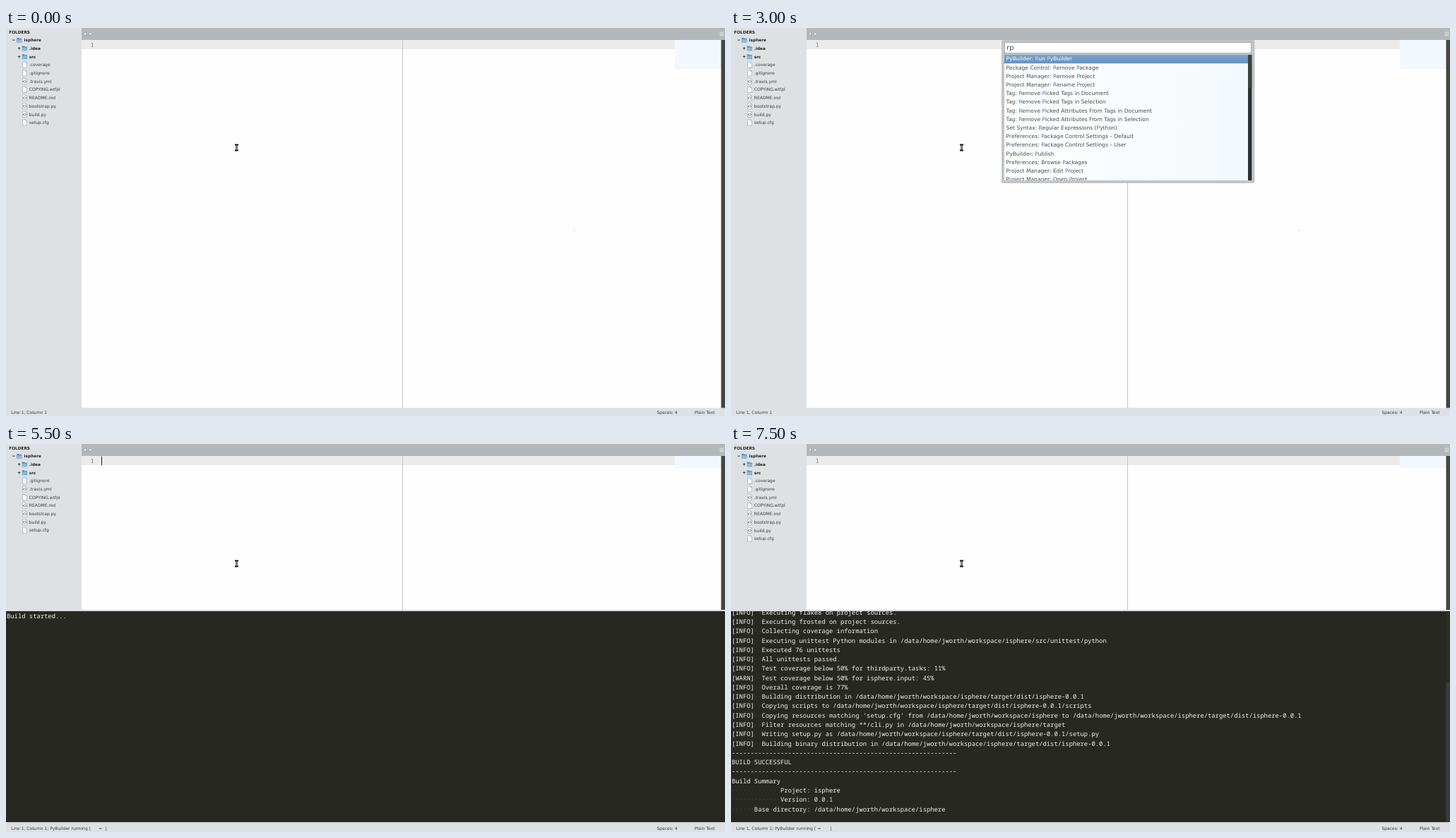
Animation of 1018 by 550 pixels, one loop 8 s. Source, as an HTML page:

```html
<!DOCTYPE html>
<html lang="en">
<head>
<meta charset="utf-8">
<title>Editor build run</title>
<style>
html, body { margin: 0; width: 100%; height: 100%; overflow: hidden; background: #fefefe; }
svg { display: block; width: 1018px; height: 550px; text-rendering: geometricPrecision; }
text { white-space: pre; }
.ui { font: 6.03px "DejaVu Sans", sans-serif; fill: #3a3b3c; }
.bold { font: bold 5.78px "DejaVu Sans", sans-serif; fill: #222; }
.row { font: 7.58px "DejaVu Sans", sans-serif; fill: #4a4c4f; }
.row .hit { fill: #3f78b8; }
.row.on { fill: #fff; }
.row.on .hit { fill: #c3dcf6; }
.query { font: 9.7px "DejaVu Sans", sans-serif; fill: #3f4a5c; }
.mono { font: 8.86px "Noto Sans Mono", "DejaVu Sans Mono", monospace; fill: #f4f4ee; }
.dim { fill: #55564e; }

/* Eight second loop, one slot every 6.25% */
.anim { animation: 8s step-end infinite; }
#caret { animation-name: caret; }
#palette { animation-name: palette; }
#allRows { animation-name: allRows; }
#hitRows { animation-name: hitRows; }
#typed { animation-name: typed; }
#panel, #running { animation-name: panel; }
#bigMap { animation-name: bigMap; }
#mark { animation-name: mark; }
#coverage { animation-name: coverage; }
#files { animation-name: files; }
#part1 { animation-name: part1; }
#part2 { animation-name: part2; }
#part3, #bar { animation-name: part3; }
#part4 { animation-name: part4; }
#log { animation-name: log; }
@keyframes caret {
  0%, 12.5%, 25%, 50%, 62.5%, 93.75%, 100% { opacity: 0; }
  6.25%, 18.75%, 43.75%, 56.25%, 68.75%, 87.5% { opacity: 1; }
  81.25% { opacity: .35; }
}
@keyframes palette { 0%, 43.75%, 100% { visibility: hidden; } 25% { visibility: visible; } }
@keyframes allRows { 0%, 31.25%, 100% { visibility: hidden; } 25% { visibility: visible; } }
@keyframes hitRows { 0%, 43.75%, 100% { visibility: hidden; } 31.25% { visibility: visible; } }
@keyframes typed { 0%, 37.5%, 100% { visibility: hidden; } 31.25% { visibility: visible; } }
@keyframes panel { 0% { visibility: hidden; } 43.75%, 100% { visibility: visible; } }
@keyframes bigMap { 0% { visibility: visible; } 43.75%, 100% { visibility: hidden; } }
@keyframes mark {
  0%, 43.75% { transform: translateX(6.36px); }
  50% { transform: translateX(12.72px); }
  56.25%, 93.75%, 100% { transform: translateX(2.12px); }
  62.5% { transform: translateX(8.48px); }
  68.75%, 81.25% { transform: translateX(10.6px); }
  75% { transform: translateX(4.24px); }
  87.5% { transform: translateX(6.36px); }
}
@keyframes coverage { 0%, 75%, 100% { visibility: visible; } 62.5% { visibility: hidden; } }
@keyframes files { 0%, 75%, 100% { transform: none; } 62.5% { transform: translateY(-11.69px); } }
@keyframes part1 { 0% { visibility: hidden; } 75%, 100% { visibility: visible; } }
@keyframes part2 { 0% { visibility: hidden; } 81.25%, 100% { visibility: visible; } }
@keyframes part3 { 0% { visibility: hidden; } 87.5%, 100% { visibility: visible; } }
@keyframes part4 { 0% { visibility: hidden; } 93.75%, 100% { visibility: visible; } }
@keyframes log {
  0% { transform: none; }
  87.5% { transform: translateY(-58.4px); }
  93.75%, 100% { transform: translateY(-151.4px); }
}
</style>
</head>
<body>
<svg viewBox="0 0 1018 550" xmlns="http://www.w3.org/2000/svg">
  <defs>
    <linearGradient id="rowFill" x1="0" y1="0" x2="0" y2="1">
      <stop offset="0" stop-color="#7aa3ca"/><stop offset="1" stop-color="#6492c0"/>
    </linearGradient>
    <linearGradient id="listFill" x1="0" y1="0" x2="1" y2="0">
      <stop offset="0" stop-color="#fdfefe"/><stop offset="1" stop-color="#f4f9fd"/>
    </linearGradient>
    <clipPath id="listClip"><rect x="387" y="38" width="345" height="178"/></clipPath>
    <clipPath id="logClip"><rect y="237" width="1018" height="299"/></clipPath>
    <g id="page">
      <path d="M.6-4.2H4.6L6.4-2.4V4.2H.6Z" fill="#fbfbfb" stroke="#9a9da0" stroke-width=".6"/>
      <path d="M4.6-4.2V-2.4H6.4" fill="none" stroke="#9a9da0" stroke-width=".5"/>
    </g>
    <g id="code">
      <use href="#page"/>
      <path d="M2.9-1.4L1.5.3 2.9 2M4.1-1.4L5.5.3 4.1 2" fill="none" stroke="#333" stroke-width=".8"/>
    </g>
    <g id="folder">
      <path d="M0-3.2H3L3.7-2.3H7.2V3.5H0Z" fill="#4f8dc6"/>
      <path d="M.4-1H6.8V3.1H.4Z" fill="#8dbbe4"/>
    </g>
  </defs>

  <rect width="1018" height="550" fill="#fefefe"/>
  <rect x="107" y="17" width="840" height="13" fill="#ecebeb"/>
  <rect x="561" y="17" width="1" height="522" fill="#c3c3c3"/>
  <rect x="947" y="17" width="65.5" height="16.5" fill="#f2f8fd"/>
  <rect id="bigMap" class="anim" x="947" y="17" width="65.5" height="41" fill="#f2f8fd"/>
  <rect x="1012.5" y="17" width="5.5" height="522" fill="#434444"/>
  <rect x="804" y="286" width="1" height="2" fill="#b5b5b5"/>
  <text class="mono" x="119.6" y="27.2" style="fill:#858585">1</text>
  <rect id="caret" class="anim" x="135" y="17.5" width="1" height="12.5" fill="#222"/>

  <rect x="107" width="911" height="17" fill="#b4b8bb"/>
  <g fill="#eef0f1" stroke="#85898c" stroke-width=".5">
    <path d="M113.6 5.4V11L109.8 8.2Z"/><path d="M118 5.4V11L121.8 8.2Z"/>
  </g>
  <path d="M1010.5 6.2H1016M1010.5 8.4H1016M1010.5 10.6H1016" stroke="#e3e5e6" stroke-width="1"/>

  <rect width="107" height="539" fill="#dde1e4"/>
  <g id="side"></g>

  <g id="pointer" fill="none">
    <path d="M324 165.5H329M324 173.5H329M326.5 165.5V173.5" stroke="#111" stroke-width="2.2"/>
    <path d="M326.5 166.3V172.7" stroke="#ddd" stroke-width=".6"/>
  </g>

  <g id="palette" class="anim">
    <rect x="383" y="17" width="358.5" height="203" rx="2" fill="#c2c5c7"/>
    <rect x="387.3" y="20.3" width="349.4" height="15.4" fill="#fff" stroke="#8b9196" stroke-width=".7"/>
    <rect x="387" y="38" width="345" height="178" fill="url(#listFill)"/>
    <rect x="387" y="38" width="345" height="12.2" fill="url(#rowFill)"/>
    <rect x="732" y="38" width="5.3" height="178" fill="#2c2e2f"/>
    <rect x="732" y="38" width="5.3" height="47" fill="#3d3f40"/>
  </g>
  <g clip-path="url(#listClip)">
    <g id="allRows" class="anim"></g>
    <g id="hitRows" class="anim"></g>
  </g>
  <g id="typedText"></g>

  <g id="panel" class="anim">
    <rect y="235" width="1018" height="304" fill="#d9dbdc"/>
    <rect y="237" width="1018" height="299" fill="#272822"/>
  </g>
  <g clip-path="url(#logClip)"><g id="log" class="anim"></g></g>
  <g id="bar" class="anim">
    <rect x="1012.5" y="237" width="5.5" height="299" fill="#2b2c29"/>
    <rect x="1012.5" y="338" width="5.5" height="198" fill="#3b3c39"/>
  </g>

  <rect y="538.5" width="1018" height="11.5" fill="#dde1e4"/>
  <g class="ui">
    <text x="7.2" y="547.2">Line 1, Column 1</text>
    <text x="921.4" y="547.2">Spaces: 4</text>
    <text x="975" y="547.2">Plain Text</text>
    <g id="running" class="anim">
      <text x="58.2" y="547.2">; PyBuilder running [</text>
      <text id="mark" class="anim" x="120.4" y="547.2">=</text>
      <text x="140.3" y="547.2">]</text>
    </g>
  </g>
</svg>
<script>
const $ = id => document.getElementById(id);

function add(parent, tag, attrs, text) {
  const el = document.createElementNS("http://www.w3.org/2000/svg", tag);
  for (const key in attrs) el.setAttribute(key, attrs[key]);
  if (text) el.textContent = text;
  return parent.appendChild(el);
}

// Sidebar
const side = $("side");
const rowY = i => 17.1 + 11.69 * i;
const label = (g, x, y, text, cls) => add(g, "text", { x, y: y + 2.2, class: cls }, text);
const icon = (g, name, x, y) => add(g, "use", { href: "#" + name, x, y });

label(side, 4.2, 5.9, "FOLDERS", "bold");
["isphere", ".idea", "src"].forEach((name, i) => {
  const y = rowY(i), x = i ? 22.8 : 15.2;
  icon(side, "folder", x, y);
  label(side, i ? 32.8 : 25.6, y, name, "bold");
  add(side, "path", {
    d: `M${x - 6} ${y}h3.6` + (i ? `m-1.8 -1.8v3.6` : ""),
    stroke: "#444", "stroke-width": 1.1
  });
});
const coverage = add(side, "g", { id: "coverage", class: "anim" });
const files = add(side, "g", { id: "files", class: "anim" });
[".coverage", ".gitignore", ".travis.yml", "COPYING.wtfpl", "README.md",
 "bootstrap.py", "build.py", "setup.cfg"].forEach((name, i) => {
  const g = i ? files : coverage, y = rowY(i + 3);
  icon(g, /\.(yml|md|py)$/.test(name) ? "code" : "page", 23, y);
  label(g, 32.8, y, name, "ui");
});

// Command palette: * marks a matched letter, | starts the key binding
function fill(g, rows) {
  rows.forEach((row, i) => {
    const y = 46.4 + 12.2 * i, cls = i ? "row" : "row on";
    const [name, keys] = row.split("|");
    const t = add(g, "text", { x: 389.6, y, class: cls });
    name.split(/(\*.)/).forEach(s => {
      if (s) add(t, "tspan", s[0] === "*" ? { class: "hit" } : {}, s.replace("*", ""));
    });
    if (keys) add(g, "text", { x: 729.5, y, class: cls, "text-anchor": "end" }, keys);
  });
}
fill($("allRows"), [
  "PyBuilder: Run PyBuilder",
  "Code Folding: Fold All",
  "Code Folding: Fold Tag Attributes|Ctrl+K, Ctrl+T",
  "Code Folding: Unfold All|Ctrl+K, Ctrl+J",
  "Convert Case: Lower Case|Ctrl+K, Ctrl+L",
  "Convert Case: Swap Case",
  "Convert Case: Title Case",
  "Convert Case: Upper Case|Ctrl+K, Ctrl+U",
  "File: New View into File",
  "File: Revert",
  "File: Save All",
  "HTML: Encode Special Characters",
  "HTML: Wrap Selection With Tag|Alt+Shift+W",
  "Indentation: Convert to Spaces",
  "Indentation: Convert to Tabs"
]);
fill($("hitRows"), [
  "PyBuilder: *Run *PyBuilder",
  "Package Control: *Remove *Package",
  "Project Manager: *Remove *Project",
  "Project Manager: *Rename *Project",
  "Tag: *Remove *Picked Tags in Document",
  "Tag: *Remove *Picked Tags in Selection",
  "Tag: *Remove *Picked Attributes From Tags in Document",
  "Tag: *Remove *Picked Attributes From Tags in Selection",
  "Set Syntax: *Regular Expressions (*Python)",
  "P*references: *Package Control Settings – Default",
  "P*references: *Package Control Settings – User",
  "PyBuilde*r: *Publish",
  "Prefe*rences: Browse *Packages",
  "P*roject Manager: Edit *Project",
  "P*roject Manager: Open *Project"
]);
add($("hitRows").parentNode.parentNode.querySelector("#typedText"), "rect",
  { id: "typed", class: "anim", x: 400, y: 22, width: 1, height: 12, fill: "#333" });
const query = add($("typedText"), "g", { class: "anim", style: "animation-name:hitRows" });
add(query, "text", { x: 390.2, y: 31.2, class: "query" }, "rp");
const start = add($("typedText"), "g", { class: "anim", style: "animation-name:allRows" });
add(start, "rect", { x: 390, y: 22, width: 1, height: 12, fill: "#333" });

// Build output
const home = "/data/home/jworth/workspace/isphere";
const dist = home + "/target/dist/isphere-0.0.1";
const rule = "-".repeat(60);
const info = s => "[INFO]  " + s;
const tests = [
  `Executing unittest Python modules in ${home}/src/unittest/python`,
  "Executed 76 unittests",
  "All unittests passed."
].map(info);
const parts = [
  ["Build started..."],
  ["PyBuilder version 0.10.39", "Build started at 2015-02-06 12:36:37", rule],
  [
    info("Building isphere version 0.0.1"),
    info("Executing build in " + home),
    info("Going to execute tasks: clean, analyze, publish"),
    info(`Removing target directory ${home}/target`),
    ...tests,
    info("Executing flake8 on project sources."),
    info("Executing frosted on project sources."),
    info("Collecting coverage information")
  ],
  [
    ...tests,
    info("Test coverage below 50% for thirdparty.tasks: 11%"),
    "[WARN]  Test coverage below 50% for isphere.input: 45%",
    info("Overall coverage is 77%"),
    info("Building distribution in " + dist),
    info(`Copying scripts to ${dist}/scripts`),
    info(`Copying resources matching 'setup.cfg' from ${home} to ${dist}`),
    info(`Filter resources matching **/cli.py in ${home}/target`),
    info(`Writing setup.py as ${dist}/setup.py`),
    info("Building binary distribution in " + dist)
  ],
  [
    rule, "BUILD SUCCESSFUL", rule, "Build Summary",
    " ".repeat(13) + "Project: isphere",
    " ".repeat(13) + "Version: 0.0.1",
    " ".repeat(6) + "Base directory: " + home
  ]
];
let line = 0;
parts.forEach((lines, n) => {
  const g = add($("log"), "g", n
    ? { id: "part" + n, class: "anim" }
    : { class: "anim", style: "animation-name:panel" });
  for (const s of lines) {
    const t = add(g, "text", { x: 1, y: 247 + 13.28 * line++, class: "mono" });
    s.split(/( +)/).forEach(w => {
      if (w) add(t, "tspan", w[0] === " " ? { class: "dim" } : {}, w.replace(/ /g, "·"));
    });
  }
});
</script>
</body>
</html>
```
